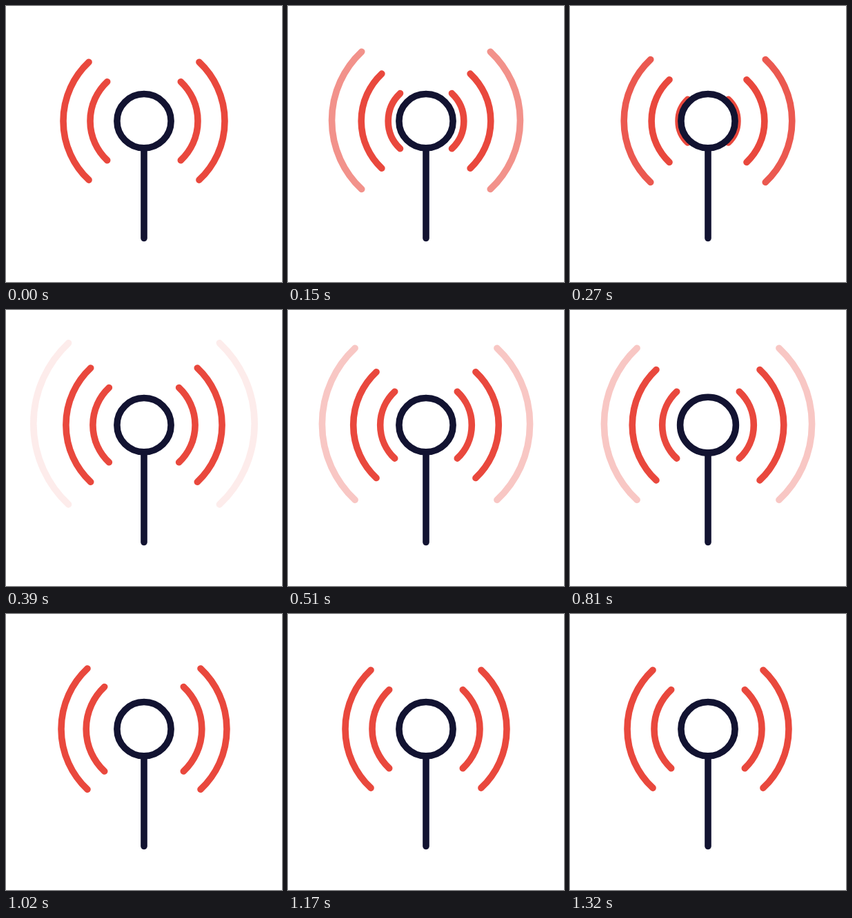
An HTML page for the animation above (2.34 s loop, 400 px wide and 400 px high).

```html
<!DOCTYPE html>
<html lang="en">
<head>
<meta charset="utf-8">
<title>Antenna</title>
<style>
  html, body { margin: 0; width: 100%; height: 100%; overflow: hidden; background: #fff; }
  svg { display: block; width: 100%; height: 100%; }
  path, circle { fill: none; stroke-width: 9.6; stroke-linecap: round; }
  .wave { stroke: #e9483d; }
  .mast { stroke: #121331; }
</style>
</head>
<body>
<svg viewBox="0 0 400 400">
  <path class="wave" id="inner"/>
  <path class="wave" id="middle"/>
  <path class="wave" id="outer"/>
  <path class="mast" id="stem"/>
  <circle class="mast" id="ring" cx="200" cy="166.67"/>
</svg>
<script>
const LOOP = 2340, STEP = 30, LAST = 44;
const CX = 200, CY = 166.67, BASE = 39, SPREAD = 46.9 * Math.PI / 180;
const [inner, middle, outer, stem, ring] =
  ["inner", "middle", "outer", "stem", "ring"].map(id => document.getElementById(id));

const clamp = x => Math.min(1, Math.max(0, x));
const smooth = x => { x = clamp(x); return x * x * (3 - 2 * x); };
const easeOut = x => Math.sin(clamp(x) * Math.PI / 2);

// A pair of mirrored arcs around the ring
function setArcs(el, r, y = CY, opacity = 1) {
  const dx = r * Math.cos(SPREAD) * 1, dy = r * Math.sin(SPREAD);
  const arc = (side, sweep) =>
    `M${CX + side * dx} ${y - dy}A${r} ${r} 0 0 ${sweep} ${CX + side * dx} ${y + dy}`;
  el.setAttribute("d", arc(-1, 0) + arc(1, 1));
  el.setAttribute("opacity", opacity);
}

// Rush from one radius past the goal, then settle back
function overshoot(k, from, peak, goal, start, top, end) {
  return k < top
    ? from + (peak - from) * easeOut((k - start) / (top - start))
    : peak + (goal - peak) * smooth((k - top) / (end - top));
}

function draw(time) {
  const k = 2 * Math.min(LAST, Math.floor((time % LOOP) / STEP));
  // The first wave speeds up, the following ones run evenly
  const p = k < 17 ? (k / 17) ** 1.7 : ((k - 17) % 10) / 10;

  const r1 = k < 57 ? BASE * (1 + p) : overshoot(k, 78, 87, 78, 57, 64, 74);
  const r2 = k < 47 ? BASE * (2 + p) : overshoot(k, 78, 125.5, 117, 47, 62, 72);
  setArcs(inner, r1);
  setArcs(middle, r2);
  setArcs(outer, 117 + 48 * p, CY - 2 * p, k < 57 ? 1 - p : 0);
  inner.style.visibility = r1 > BASE + 0.2 ? "visible" : "hidden";

  const pulse = k < 47 ? smooth((k - 37) / 10) : 1 - smooth((k - 47) / 11);
  const r = BASE + 0.1 + 4.3 * pulse;
  ring.setAttribute("r", r);
  stem.setAttribute("d", `M200 ${CY + r}V336.5`);
}

const begin = performance.now();
function tick() {
  draw(performance.now() - begin);
  requestAnimationFrame(tick);
}
tick();
</script>
</body>
</html>
```
